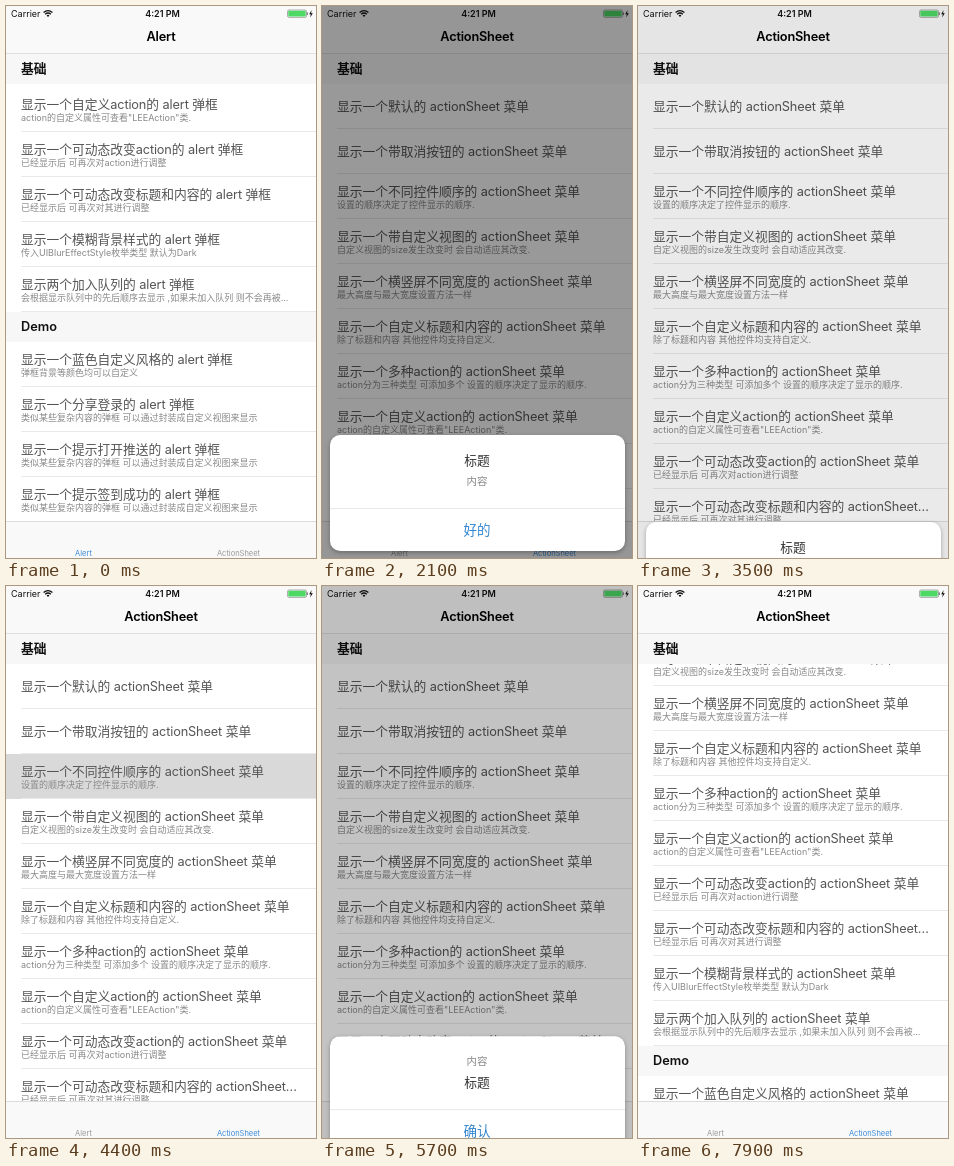
Recreate the animation shown at these times as an HTML page. Size 310x552 px, loop 8 s.

```html
<!DOCTYPE html>
<html lang="zh-CN">
<head>
<meta charset="utf-8">
<style>
html, body { margin: 0; width: 100%; height: 100%; overflow: hidden; background: #fff; }
body { position: relative; font: 12.75px/16px Inter, "Noto Sans CJK SC", "Noto Sans CJK", sans-serif; color: #555; }
#stage { position: absolute; left: 0; top: 0; width: 310px; height: 552px; overflow: hidden; background: #fff; }
#stage * { position: absolute; white-space: nowrap; box-sizing: border-box; }
#stage span { position: static; letter-spacing: -.15px; }
.page, .list, .fill { left: 0; top: 0; width: 310px; height: 552px; }
.row { left: 0; width: 310px; height: 45px; }
.row::after { content: ""; position: absolute; left: 15px; right: 0; bottom: 0; height: 1px; background: #e9e9eb; }
.row b { left: 15px; top: 15px; font-weight: 400; }
.row.two b { top: 10px; }
.row i { left: 15px; top: 25px; font: 9px/12px Inter, "Noto Sans CJK SC", "Noto Sans CJK", sans-serif; color: #888; }
.head { left: 0; width: 310px; height: 30px; padding: 7px 15px; background: #f7f7f7; color: #111; font-weight: 600; }
.nav { left: 0; top: 0; width: 310px; height: 48px; background: #f9f9f9; border-bottom: 1px solid #e0e0e2; }
.title { left: 0; width: 310px; top: 23px; text-align: center; font-weight: 600; color: #000; letter-spacing: -.2px; }
.tabs { left: 0; top: 515px; width: 310px; height: 37px; background: #f9f9f9; border-top: 1px solid #dcdcde; }
.tabs b { top: 27px; width: 155px; text-align: center; font: 7.5px/10px Inter, sans-serif; color: #999; }
.tabs .on { color: #3b8ad8; }
.bar { left: 306px; width: 2px; border-radius: 1px; background: #7f7f7f; }
.status { font-size: 9px; line-height: 12px; color: #111; top: 2px; }
.card { left: 7.5px; width: 295px; background: #fff; border-radius: 10px; box-shadow: 0 1.5px 4px rgba(0,0,0,.3); text-align: center; }
.card b { left: 0; width: 295px; font-weight: 400; }
.card .t { color: #333; }
.card .c { font-size: 10.5px; color: #888; }
.card .act { font-size: 13.5px; height: 43px; line-height: 43px; bottom: 0; color: #3285d0; }
.card .line { border-top: 1px solid #e8e8e8; }
</style>
</head>
<body>
<div id="stage"></div>
<script>
const SCROLL = 158, ROW = 45, FIRST_ROW = 78, DIM = .4;
const latin = s => s.replace(/[A-Za-z]+/g, '<span>$&</span>');
const row = ([title, sub], y) =>
  `<div class="row${sub ? ' two' : ''}" style="top:${y}px"><b>${latin(title)}</b>${sub ? `<i>${sub}</i>` : ''}</div>`;
const rows = (items, y) => items.map((item, k) => row(item, y + k * ROW)).join('');
const head = (text, y) => `<div class="head" style="top:${y}px">${text}</div>`;

const shared = kind => [
  [`显示一个自定义action的 ${kind}`, 'action的自定义属性可查看"LEEAction"类.'],
  [`显示一个可动态改变action的 ${kind}`, '已经显示后 可再次对action进行调整'],
  [`显示一个可动态改变标题和内容的 ${kind == 'alert 弹框' ? kind : 'actionSheet...'}`, '已经显示后 可再次对其进行调整'],
  [`显示一个模糊背景样式的 ${kind}`, '传入UIBlurEffectStyle枚举类型 默认为Dark'],
  [`显示两个加入队列的 ${kind}`, '会根据显示队列中的先后顺序去显示 ,如果未加入队列 则不会再被...']
];
const alertBase = shared('alert 弹框');
const wrapped = '类似某些复杂内容的弹框 可以通过封装成自定义视图来显示';
const alertDemo = [
  ['显示一个蓝色自定义风格的 alert 弹框', '弹框背景等颜色均可以自定义'],
  ['显示一个分享登录的 alert 弹框', wrapped],
  ['显示一个提示打开推送的 alert 弹框', wrapped],
  ['显示一个提示签到成功的 alert 弹框', wrapped]
];
const sheetBase = [
  ['显示一个默认的 actionSheet 菜单'],
  ['显示一个带取消按钮的 actionSheet 菜单'],
  ['显示一个不同控件顺序的 actionSheet 菜单', '设置的顺序决定了控件显示的顺序.'],
  ['显示一个带自定义视图的 actionSheet 菜单', '自定义视图的size发生改变时 会自动适应其改变.'],
  ['显示一个横竖屏不同宽度的 actionSheet 菜单', '最大高度与最大宽度设置方法一样'],
  ['显示一个自定义标题和内容的 actionSheet 菜单', '除了标题和内容 其他控件均支持自定义.'],
  ['显示一个多种action的 actionSheet 菜单', 'action分为三种类型 可添加多个 设置的顺序决定了显示的顺序.'],
  ...shared('actionSheet 菜单')
];
const sheetDemo = [['显示一个蓝色自定义风格的 actionSheet 菜单', '弹框背景等颜色均可以自定义']];

const page = (id, name, list) => `<div class="page" id="${id}">
  <div class="list">${list}</div>${head('基础', 48)}
  <div class="nav"><div class="title">${name}</div></div>
  <div class="tabs">${['Alert', 'ActionSheet'].map((tab, k) =>
    `<b class="${tab == name ? 'on' : ''}" style="left:${k * 155}px">${tab}</b>`).join('')}</div></div>`;

const sheet = (top, lines, action, cancel) => `<div class="fill sheet">
  <div class="card" style="top:${top}px;height:116px">
    ${lines.map(([cls, text], k) => `<b class="${cls}" style="top:${18 + k * 21.5}px">${text}</b>`).join('')}
    <b class="act line">${action}</b></div>
  ${cancel ? '<div class="card" style="top:502px;height:42.7px"><b class="act">取消</b></div>' : ''}</div>`;

const heading = ['t', '标题'], body = ['c', '内容'];
const stage = document.getElementById('stage');
stage.innerHTML =
  page('alert', 'Alert', rows(alertBase, 80.5) + head('Demo', 305.5) + rows(alertDemo, 335.5)) +
  page('action', 'ActionSheet', '<div class="row" id="press" style="background:#d9d9d9"></div>' +
    rows(sheetBase, FIRST_ROW) + head('Demo', 618) + rows(sheetDemo, 648)) +
  `<div class="bar" id="bar" style="height:295px"></div>
  <div class="status" style="left:5px">Carrier</div>
  <div class="status" style="left:1.5px;width:310px;text-align:center;font-weight:600">4:21 PM</div>
  <svg class="fill" viewBox="0 0 310 552" fill="none" stroke="#111">
    <path d="M37.6 6.6Q42 2.6 46.4 6.6M39.2 8.3Q42 5.8 44.8 8.3" stroke-width="1.3"/>
    <path d="M40.6 9.4Q42 8.2 43.4 9.4L42 11Z" fill="#111" stroke="none"/>
    <rect x="281.5" y="4" width="19" height="7.4" rx="1.5" stroke="#777" stroke-width=".6"/>
    <rect x="282.3" y="4.8" width="17.4" height="5.8" rx=".8" fill="#4cd964" stroke="none"/>
    <path d="M301.4 6.4v2.6" stroke="#777"/>
    <path d="M305.6 4l-2.4 4.2h1.6l-.6 3.4 2.6-4.4h-1.7z" fill="#111" stroke="none"/>
  </svg>
  <div class="fill" id="dim" style="background:#000"></div>` +
  sheet(428.7, [heading, body], '好的', false) +
  sheet(378.5, [heading, body], '确认', true) +
  sheet(378.5, [body, heading], '确认', true);

const $ = id => document.getElementById(id);
const list = document.querySelector('#action .list');
const sheets = [...document.querySelectorAll('.sheet')];
const timing = [ // opening time, closing time, travel
  [1570, 2420, 123.3], [2760, 3360, 173.5], [4498, 5613, 173.5]
];
const ramp = (t, start, length) => Math.min(1, Math.max(0, (t - start) / length));
const smooth = x => x * x * (3 - 2 * x);

function draw(now) {
  const t = now % 8000, onAction = t >= 500;
  $('alert').style.display = onAction ? 'none' : '';
  $('action').style.display = onAction ? '' : 'none';

  const scrolled = SCROLL * (1 - (1 - ramp(t, 6450, 650)) ** 3);
  list.style.transform = `translateY(${-scrolled}px)`;
  $('bar').style.top = 50 + scrolled * .63 + 'px';
  $('bar').style.opacity = t < 6000
    ? onAction * (1 - ramp(t, 1400, 250))
    : ramp(t, 6450, 80) * (1 - ramp(t, 7050, 250));

  let dim = 0, press = 0;
  timing.forEach(([open, close, travel], k) => {
    const shown = smooth(ramp(t, open, 300)) * (1 - smooth(ramp(t, close, 200)));
    sheets[k].style.transform = `translateY(${(1 - shown) * travel}px)`;
    sheets[k].style.display = shown ? '' : 'none';
    dim += shown * DIM;
    if (t >= open - 100 && t < open + 450) {
      press = 1 - ramp(t, open + 120, 330);
      $('press').style.top = FIRST_ROW + k * ROW + 'px';
    }
  });
  $('dim').style.opacity = dim;
  $('press').style.opacity = press;
  requestAnimationFrame(draw);
}
requestAnimationFrame(draw);
</script>
</body>
</html>
```
